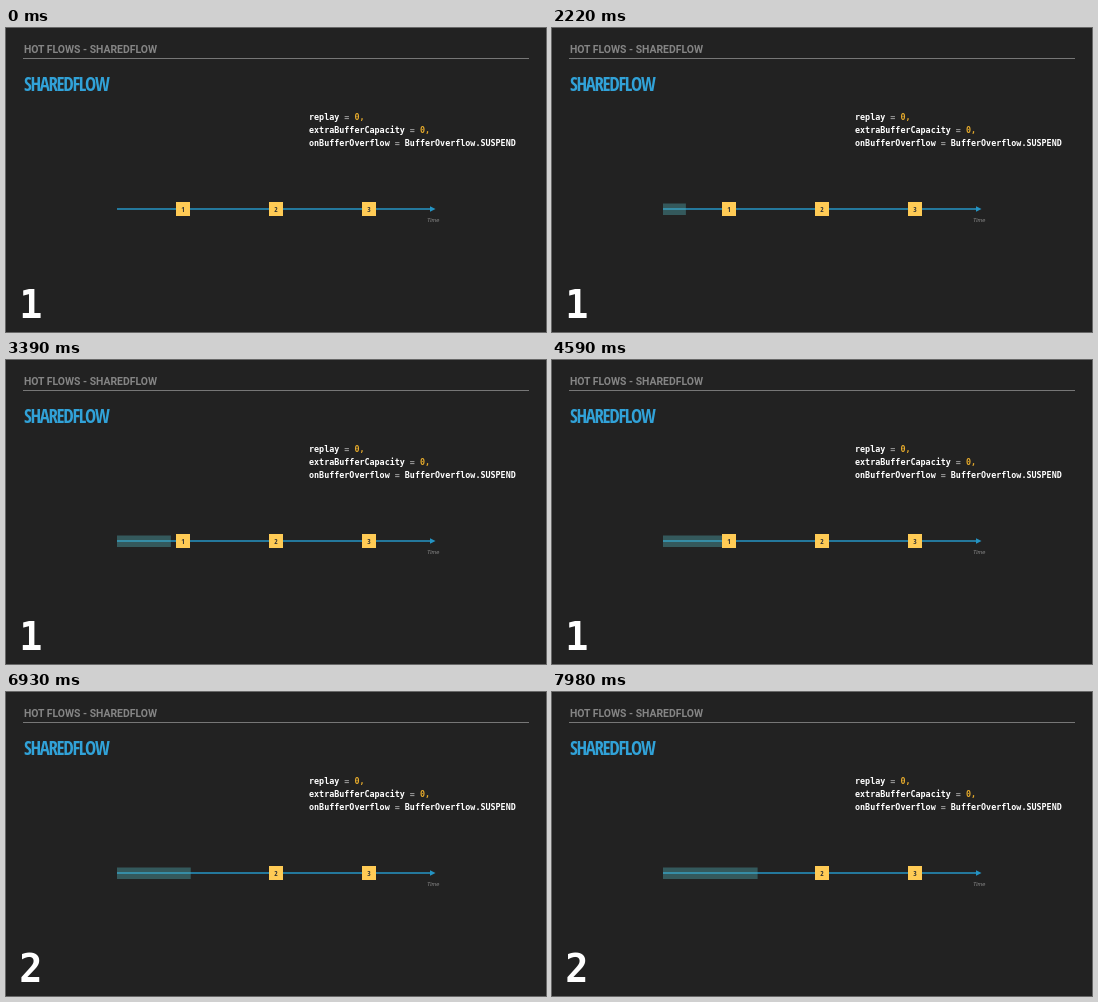
Animation, 540 px wide and 304 px high, one loop 8000 ms. Source, as an HTML page:

```html
<!DOCTYPE html>
<html lang="en">
<head>
<meta charset="utf-8">
<title>SharedFlow</title>
<style>
  html, body { margin: 0; width: 100%; height: 100%; overflow: hidden; background: #222; }
  svg { display: block; width: 540px; height: 304px; }
  .heading { font: bold 10.4px Roboto, sans-serif; fill: #858585; }
  .title, .item text {
    font-family: "Open Sans Condensed", "Roboto Condensed", "Open Sans", Roboto, sans-serif;
    font-weight: bold;
    font-stretch: condensed;
  }
  .title { font-size: 20px; letter-spacing: -.07em; fill: #31a2d8; }
  .code { font: bold 8.4px "DejaVu Sans Mono", monospace; fill: #fff; }
  .op { fill: #999; }
  .num { fill: #e8ac2c; }
  .axis { font: italic 5.6px "Liberation Sans", sans-serif; fill: #8a8a8a; }
  .item rect { fill: #ffcb55; }
  .item text { font-size: 7.5px; fill: #333; text-anchor: middle; }
  .counter { font: bold 38.5px "DejaVu Sans Mono", monospace; fill: #fff; text-anchor: middle; }
</style>
</head>
<body>
<svg viewBox="0 0 540 304">
  <linearGradient id="glow">
    <stop stop-color="#ffcb55" stop-opacity="0"/>
    <stop offset=".6" stop-color="#ffcb55"/>
  </linearGradient>
  <rect width="540" height="304" fill="#222"/>
  <text class="heading" x="18" y="25" data-width="133.5">HOT FLOWS - SHAREDFLOW</text>
  <path d="M17 30.5H523" stroke="#777"/>
  <text class="title" x="18" y="63" data-width="84.5">SHAREDFLOW</text>

  <g class="code">
    <text x="303" y="92">replay <tspan class="op">=</tspan> <tspan class="num">0,</tspan></text>
    <text x="303" y="104.8">extraBufferCapacity <tspan class="op">=</tspan> <tspan class="num">0,</tspan></text>
    <text x="303" y="117.7">onBufferOverflow <tspan class="op">=</tspan> BufferOverflow.SUSPEND</text>
  </g>

  <path d="M111 181H425" stroke="#2494c4" stroke-width="1.7"/>
  <path d="M424 178.3L429.5 181L424 183.7Z" fill="#2494c4"/>
  <text class="axis" x="421" y="194">Time</text>
  <rect id="progress" x="111" y="175.5" height="11.5" fill="#50adb4" fill-opacity=".4"/>
  <rect id="sweep" y="175.5" height="11.5" fill="url(#glow)"/>
  <g id="items"></g>
  <text id="counter" class="counter" x="24.8" y="290">1</text>
</svg>
<script>
const LOOP = 8000;
const byId = id => document.getElementById(id);
const clamp = x => Math.min(1, Math.max(0, x));
const easeInOut = x => (1 - Math.cos(Math.PI * clamp(x))) / 2;

byId('items').innerHTML = [1, 2, 3].map((n, i) => `
  <g class="item" transform="translate(${170 + 93 * i} 174)">
    <rect width="14" height="14"/><text x="7" y="10.2">${n}</text>
  </g>`).join('');
const firstItem = byId('items').firstElementChild;

// Reduce the type size where the available font runs too wide.
for (const label of document.querySelectorAll('[data-width]')) {
  const size = parseFloat(getComputedStyle(label).fontSize);
  const ratio = label.dataset.width / label.getComputedTextLength();
  label.style.fontSize = size * Math.min(1, ratio) + 'px';
}

function draw(t) {
  const width = 73 * easeInOut((t - 640) / 4180) + 93 * easeInOut((t - 6700) / 4000);
  byId('progress').setAttribute('width', width);

  // The collected item dissolves leftwards into the bar.
  const collected = t >= 5430;
  const fade = clamp((t - 5430) / 420);
  const spread = 14 + 59 * fade;
  firstItem.setAttribute('visibility', collected ? 'hidden' : 'visible');
  byId('sweep').setAttribute('x', 184 - spread);
  byId('sweep').setAttribute('width', spread);
  byId('sweep').setAttribute('opacity', collected ? .35 * (1 - fade) : 0);

  byId('counter').textContent = t < 6330 ? 1 : 2;
}

const start = performance.now();
function tick() {
  draw((performance.now() - start) % LOOP);
  requestAnimationFrame(tick);
}
tick();
</script>
</body>
</html>
```
